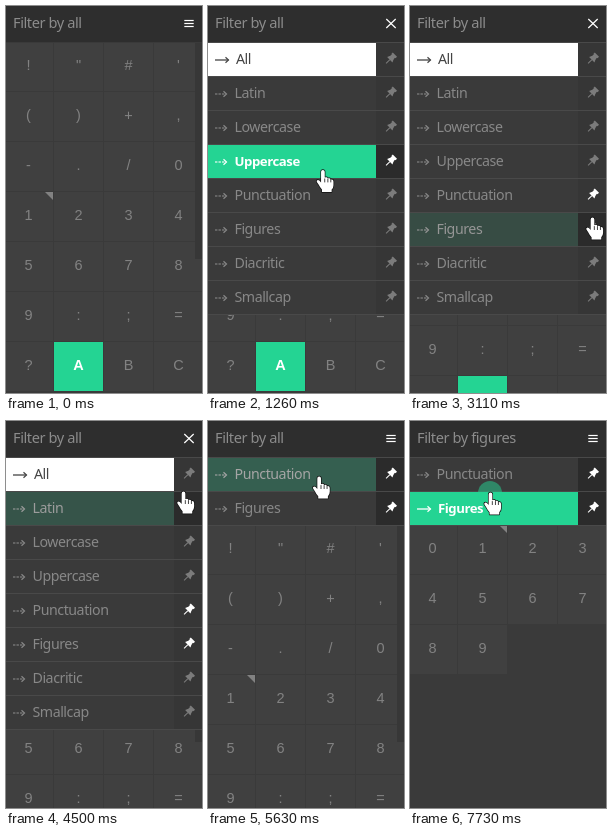
Recreate the animation shown at these times as an HTML page with a canvas. Size 196 by 387 pixels, loop 8 s.

```html
<!DOCTYPE html>
<html lang="en">
<head>
<meta charset="utf-8">
<title>Glyph filter</title>
<style>
html, body { margin: 0; width: 100%; height: 100%; overflow: hidden; background: #3a3a3a; }
canvas { display: block; width: 196px; height: 387px; }
</style>
</head>
<body>
<canvas id="stage"></canvas>
<script>
const W = 196, H = 387, LOOP = 8000, ROW = 34, TOP = 37, FADE = 350;
const UI = '"Noto Sans", "Open Sans", sans-serif';
const GLYPH = '"Liberation Sans", Arial, sans-serif';
const GREEN = [36, 212, 147], DARK = [58, 58, 58];
const GREEN_CSS = `rgb(${GREEN})`, DARK_CSS = `rgb(${DARK})`;
const LABELS = ['All', 'Latin', 'Lowercase', 'Uppercase', 'Punctuation', 'Figures', 'Diacritic', 'Smallcap'];
const PUNCT = 4, FIGURES = 5;
const SETS = {
  all: '!"#\'()+,-./0123456789:;=?ABC',
  punctuation: '!"#\'()+,-./:;=?@[\\]_{|}…«»',
  figures: '0123456789'
};

// time, x, y, linear
const PATH = [
  [30, 200, 342], [400, 182, 15], [720, 182, 15], [850, 64, 165, 1], [950, 64, 165],
  [1500, 150, 164], [1900, 181, 198], [3030, 181, 198], [3110, 183, 212],
  [4180, 183, 212], [4400, 180, 131, 1], [4500, 178, 71, 1], [4960, 182, 14],
  [5440, 182, 14], [5650, 110, 57], [6440, 110, 57], [6640, 81, 72]
];
// start, length, end radius
const CLICKS = [[430, 300, 12], [2260, 600, 24], [3780, 130, 12], [5090, 300, 12], [5930, 290, 12], [7600, 400, 12]];

const canvas = document.getElementById('stage');
const c = canvas.getContext('2d');
const scale = window.devicePixelRatio || 1;
canvas.width = W * scale;
canvas.height = H * scale;

const clamp = v => Math.max(0, Math.min(1, v));
const smooth = v => v * v * (3 - 2 * v);
const ramp = (t, a, b) => smooth(clamp((t - a) / (b - a)));
const mix = (a, b, k) => `rgb(${a.map((v, i) => Math.round(v + (b[i] - v) * k))})`;
const grey = v => [v, v, v];

function rect(x, y, w, h, color) {
  c.fillStyle = color;
  c.fillRect(x, y, w, h);
}

function text(s, x, y, font, color, align = 'left', spacing = 0) {
  c.font = font;
  c.letterSpacing = spacing + 'px';
  c.fillStyle = color;
  c.textAlign = align;
  c.fillText(s, x, y);
}

function line(points, color, width) {
  c.beginPath();
  points.forEach(([x, y], i) => i ? c.lineTo(x, y) : c.moveTo(x, y));
  c.strokeStyle = color;
  c.lineWidth = width;
  c.stroke();
}

const openness = t => ramp(t, 450, 760) * (1 - ramp(t, 5120, 5400));
const filterAt = t => t < 5930 ? 'all' : t < 7600 ? 'punctuation' : 'figures';
const isPinned = (i, t) => i === PUNCT && t >= 2300 || i === FIGURES && t >= 3780;

function cursor(t) {
  const n = PATH.findIndex(p => p[0] > t);
  if (n === 0) return [PATH[0][1], PATH[0][2]];
  if (n < 0) return PATH[PATH.length - 1].slice(1, 3);
  const a = PATH[n - 1], b = PATH[n];
  const u = (t - a[0]) / (b[0] - a[0]), k = b[3] ? u : smooth(u);
  return [a[1] + (b[1] - a[1]) * k, a[2] + (b[2] - a[2]) * k];
}

function layout(t) {
  const open = openness(t);
  let y = TOP;
  return LABELS.map((label, i) => {
    const h = isPinned(i, t) ? ROW : ROW * open;
    const row = { label, i, y, h };
    y += h;
    return row;
  });
}

function hovered(t) {
  const y = cursor(t)[1] + 1;
  const row = layout(t).find(r => r.h > 1 && y >= r.y && y < r.y + r.h);
  return row ? row.i : -1;
}

// Entering a row fades in, leaving it is immediate.
function hover(t) {
  const row = hovered(t);
  let age = 0;
  while (row >= 0 && age < FADE && hovered(t - age) === row) age += 5;
  return { row, k: clamp(age / FADE) };
}

function drawGrid(t) {
  const name = filterAt(t);
  const shift = ROW * (isPinned(PUNCT, t) + isPinned(FIGURES, t));
  [...SETS[name]].forEach((ch, i) => {
    const col = i % 4, x = col * 50 - 2, y = 36 + shift + Math.floor(i / 4) * 50;
    const on = ch === 'A';
    rect(x, y, 49, 49, on ? GREEN_CSS : '#404040');
    text(ch, x + 24.5, y + 28, (on ? 'bold ' : '') + '14.5px ' + GLYPH, on ? '#fff' : '#828282', 'center');
    if (ch === '1') {
      c.beginPath();
      c.moveTo(x + 41, y);
      c.lineTo(x + 49, y);
      c.lineTo(x + 49, y + 8);
      c.fillStyle = '#828282';
      c.fill();
    }
  });
  if (name === 'all') rect(189, 36 + shift, 7, 217, '#373737');
}

function drawArrow(y, active, color) {
  const end = active ? 20.5 : 18.5;
  if (active) line([[7, y], [end, y]], color, 1.3);
  else [7, 10.5, 14].forEach(x => line([[x, y], [x + 2.4, y]], color, 1.1));
  line([[end - 3, y - 2.8], [end, y], [end - 3, y + 2.8]], color, 1.2);
}

function drawPin(y, color) {
  c.save();
  c.translate(183, y);
  c.rotate(Math.PI / 4);
  rect(-3, -5.5, 6, 2, color);
  rect(-2.3, -4, 4.6, 4, color);
  c.beginPath();
  c.moveTo(-2.3, -1.5);
  c.lineTo(2.3, -1.5);
  c.lineTo(3.8, 1.7);
  c.lineTo(-3.8, 1.7);
  c.fill();
  rect(-0.5, 1.5, 1, 5.5, color);
  c.restore();
}

function drawRow(row, t, hot, open) {
  const { label, i, y, h } = row;
  if (h < 0.5) return;
  const k = hot.row === i ? hot.k : 0;
  const active = label.toLowerCase() === filterAt(t);
  const white = active && i === 0;
  const lit = active && !white;
  const ink = white ? '#444' : mix(grey(136), grey(255), lit ? 1 : k);
  const bold = !white && (lit || k > 0.6);
  c.save();
  c.beginPath();
  c.rect(0, y, W, h);
  c.clip();
  rect(0, y, W, ROW, DARK_CSS);
  rect(0, y + 33, W, 1, '#494949');
  if (white || lit || k) rect(0, y, 168, 33, white ? '#fff' : mix(DARK, GREEN, lit ? 1 : k));
  rect(168, y, 28, 33, k || open < 0.5 ? '#2b2b2b' : '#363636');
  drawArrow(y + 17, active, ink);
  text(label, active ? 28 : 26.5, y + 21, (bold ? '600 13.2px ' : '14.2px ') + UI, ink, 'left', -0.45);
  drawPin(y + 15.5, isPinned(i, t) || k > 0.3 ? '#fff' : '#7c7c7c');
  c.restore();
}

function drawHeader(t, open) {
  rect(0, 0, W, 36, '#2e2e2e');
  rect(0, 36, W, 1, open > 0 || t > 5000 ? '#494949' : DARK_CSS);
  text('Filter by ' + filterAt(t), 7, 22, '14.6px ' + UI, '#8c8c8c', 'left', -0.42);
  const d = 4.5 * open;
  [-1, 1].forEach(s => {
    const y = 17.5 + s * 3 * (1 - open);
    line([[178.3, y + s * d], [187.7, y - s * d]], '#fff', 1.2);
  });
  if (open < 0.5) line([[178.3, 17.5], [187.7, 17.5]], '#fff', 1.2);
}

function drawClicks(t, x, y) {
  CLICKS.forEach(([start, length, radius]) => {
    const u = (t - start) / length;
    if (u < 0 || u >= 1) return;
    const wide = radius > 20;
    const grow = clamp((t - start) / (wide ? length : 100));
    c.globalAlpha = wide ? 0.5 * (1 - u) : 0.5;
    c.beginPath();
    c.arc(x - 1, y, 7 + (radius - 7) * grow, 0, 7);
    c.fillStyle = GREEN_CSS;
    c.fill();
    c.globalAlpha = 1;
  });
}

function drawHand(x, y) {
  c.save();
  c.translate(x - 0.5, y - 0.5);
  c.scale(0.92, 0.96);
  const hand = new Path2D('M-2 2Q-2 0 0 0Q2 0 2 2V8Q4.5 6.8 5.4 8.8Q8 8 8.6 10Q11.5 9.4 11.5 12V16' +
    'Q11.5 19 9.5 20.5V23H-1V20.5Q-3 18.5-4.5 15.5L-6.6 12.6Q-7.3 10.6-5.5 10.4Q-4 10.4-2 13Z');
  c.lineJoin = 'round';
  c.lineWidth = 1.5;
  c.strokeStyle = '#111';
  c.stroke(hand);
  c.fillStyle = '#fff';
  c.fill(hand);
  [2, 5.4, 8.6].forEach(px => line([[px, 9], [px, 13]], '#222', 0.9));
  c.restore();
}

function draw(t) {
  c.setTransform(scale, 0, 0, scale, 0, 0);
  const open = openness(t), hot = hover(t), [x, y] = cursor(t);
  rect(0, 0, W, H, DARK_CSS);
  drawGrid(t);
  drawHeader(t, open);
  layout(t).forEach(row => drawRow(row, t, hot, open));
  drawClicks(t, x, y);
  if (t > 30) drawHand(x, y);
}

const begin = performance.now();
function tick() {
  draw((performance.now() - begin) % LOOP);
  requestAnimationFrame(tick);
}
tick();
</script>
</body>
</html>
```
